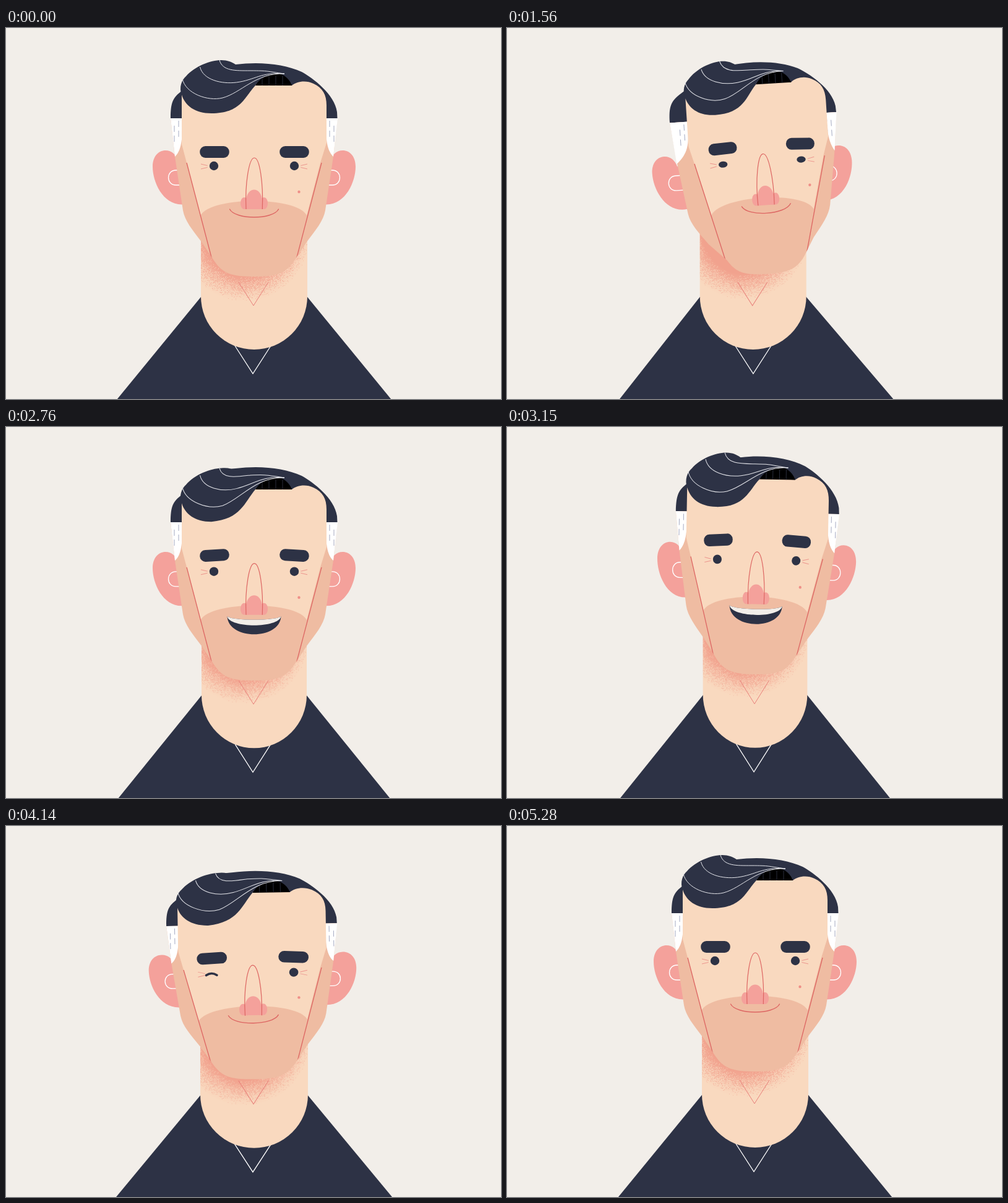
These frames come from a looping animation (800 by 600 pixels, 5400 ms). An HTML page with a canvas:

```html
<!DOCTYPE html>
<html lang="en">
<head>
<meta charset="utf-8">
<title>Portrait</title>
<style>
html, body { margin: 0; width: 100%; height: 100%; overflow: hidden; background: #f2eee9; }
canvas { display: block; }
</style>
</head>
<body>
<canvas id="stage" width="800" height="600"></canvas>
<script>
const g = document.getElementById("stage").getContext("2d");
const LOOP = 5400, CX = 401, CY = 250;
const BG = "#f2eee9", NAVY = "#2d3245", SKIN = "#f9d9bf", SHADE = "#efbca2",
      PINK = "#f4a19b", RED = "#dd6562", WHITE = "#ffffff";

// Poses name only what differs from rest.
const rest = { x: 0, y: 0, roll: 0, turn: 0, nod: 0, squash: 0, lift: 0, breath: 0, sway: 0 };
const pose = changes => ({ ...rest, ...changes });
const aside = pose({ x: 7.5, y: -2.5, roll: -3.2, turn: 1, lift: 4, sway: 1 });
const drift = pose({ x: 3.5, y: -1.5, roll: -3.7, turn: .66, lift: 3, sway: 1.1 });
const crouch = pose({ y: 13, nod: 1, squash: 1, breath: 2 });
const rise = pose({ y: 8, nod: .9, lift: 3.6, breath: -1.2 });
const grin = pose({ x: 2, y: -5.2, roll: 1.1, nod: -.7, squash: -.9, lift: 8, breath: -2 });
const wink = pose({ x: -2, y: 11.2, roll: -1, nod: 1, squash: 1, lift: 3, breath: 1.2 });
const raised = pose({ y: -5 });
const beats = [[0, rest], [480, aside], [1100, aside], [1560, drift], [2150, crouch], [2400, crouch],
  [2760, rise], [3060, grin], [3760, grin], [4140, wink], [4280, wink], [4750, raised], [LOOP, raised]];

const clamp = v => Math.max(0, Math.min(1, v));
const ramp = (t, from, to) => {
  const u = clamp((t - from) / (to - from));
  return u * u * (3 - 2 * u);
};
const pulse = (t, on, off, fade) => ramp(t, on, on + fade) - ramp(t, off, off + fade);

// Monotone cubic between beats: rests at extremes, flows through the others.
function sample(name, t) {
  const i = beats.findIndex((b, j) => t < beats[j + 1][0]);
  const slope = j => beats[j] && beats[j + 1]
    ? (beats[j + 1][1][name] - beats[j][1][name]) / (beats[j + 1][0] - beats[j][0]) : 0;
  const tangent = j => {
    const a = slope(j - 1), b = slope(j);
    return a * b <= 0 ? 0 : 2 * a * b / (a + b);
  };
  const [t0, from] = beats[i], [t1, to] = beats[i + 1];
  const d = t1 - t0, u = (t - t0) / d, v = 1 - u;
  return from[name] * v * v * (1 + 2 * u) + to[name] * u * u * (3 - 2 * u)
    + d * u * v * (tangent(i) * v - tangent(i + 1) * u);
}

function poseAt(t) {
  const p = {};
  for (const name in rest) p[name] = sample(name, t);
  const blink = pulse(t, 1525, 1680, 100);
  p.open = pulse(t, 2480, 3860, 200);
  p.eyeR = 1 - blink;
  p.eyeL = p.eyeR - pulse(t, 3980, 4380, 120);
  return p;
}

// Builds a path whose coordinate pairs pass through a mapping.
const same = (x, y) => [x, y];
const mirror = (x, y) => [2 * CX - x, y];
function shape(d, map = same) {
  return new Path2D(d.replace(/([\d.]+) ([\d.]+)/g, (_, x, y) => map(+x, +y).join(" ")));
}
function fill(path, color) { g.fillStyle = color; g.fill(path); }
function stroke(path, color, width = 1.2) {
  g.strokeStyle = color;
  g.lineWidth = width;
  g.stroke(path);
}
function disc(x, y, rx, ry, color) {
  const path = new Path2D();
  path.ellipse(x, y, rx, ry, 0, 0, 7);
  fill(path, color);
}
function group(draw) { g.save(); draw(); g.restore(); }

// Grainy shadow under the chin.
const grain = document.createElement("canvas");
grain.width = 200;
grain.height = 130;
{
  const c = grain.getContext("2d");
  let seed = 7;
  const random = () => (seed = seed * 16807 % 2147483647) / 2147483647;
  c.fillStyle = "#f1a08c";
  for (let y = 0; y < 130; y++) for (let x = 0; x < 200; x++) {
    const density = clamp((1 - Math.hypot((x - 85) / 107, (y - 10) / 112)) * 2.7) ** 1.2;
    c.globalAlpha = density * .5 + (random() < density ? .45 : 0);
    c.fillRect(x, y, 1, 1);
  }
}

function drawBody(p) {
  group(() => {
    const k = p.sway;
    g.translate(CX, p.breath * .6);
    g.scale(1 + p.breath * .0095, 1);
    g.translate(-CX, 0);
    fill(shape("M401 330L163.5 620L638.5 620Z", (x, y) => [x + k * (-3 + (y - 435) / 33), y]), NAVY);
    g.translate(-k, 0);
    stroke(shape("M370 514L399 559L428 514"), WHITE, 1.3);
    g.translate(-2 * k, 0);
    const neck = new Path2D();
    neck.roundRect(315, 300, 172, 220, [0, 0, 86, 86]);
    fill(neck, SKIN);
    group(() => {
      g.clip(neck);
      g.drawImage(grain, 300, Math.round(320 + p.y * .8 - 3 * p.turn));
    });
    stroke(shape("M376 411L400 449L424 411"), "#e8807a", 1);
  });
}

function drawEar(p, side) {
  const map = (x, y) => [
    (side < 0 ? x : 2 * CX - x) - p.turn * (10.5 + 3.5 * side),
    y + 3 * p.turn - 4.5 * Math.abs(p.nod)
  ];
  fill(shape("M290 285C255 290 237 250 237 224C237 208 246 198 258 198C268 198 275 205 278 215L290 215Z", map), PINK);
  stroke(shape("M290 230L274.5 230C258.5 230 258.5 254 274.5 254L290 254", map), WHITE, 1.3);
}

function drawSideburn(outer, inner, drop) {
  const at = (map, x, y) => map(x, y).join(" ");
  fill(new Path2D(
    "M" + at(outer, 266, 146) + "L" + at(outer, 273, 208 + drop) +
    "C" + [at(inner, 281, 200), at(inner, 286, 188), at(inner, 285, 146)] + "Z"), WHITE);
  for (let i = 0; i < 4; i++) {
    const y = 150 + i * 8, x = (outer(0, y)[0] + inner(0, y)[0]) / 2;
    const dir = outer === mirror ? -1 : 1, shift = dir * (i % 2 ? 272 : 279);
    stroke(new Path2D(`M${x + shift} ${y}v10`), "#8e95b2", .8);
  }
}

function drawHair(front, quiff) {
  fill(shape("M403 93C408 82 420 73 437 73C452 75 459 85 462 93Z", front), "#000");
  for (let x = 414; x < 450; x += 11) stroke(shape(`M${x} 77L${x} 93`, front), "#34384a", .8);
  fill(shape("M284 110C279 95 284 84 291 78C305 62 330 52 348 52C358 52 365 55 371 59L462 74L437 73" +
    "C415 76 408 86 403 93C385 112 380 138 332 138C305 138 289 125 284 108Z", quiff), NAVY);
  // Strands fan out from the parting to the rim of the quiff.
  for (let i = 0; i < 3; i++) {
    const x = 345 - 33 * i + 1.5 * i * i, y = 52 + 7 * i + 4 * i * i;
    const mx = 395 - 22.5 * i, my = 69 + 16 * i + 3 * i * i;
    stroke(shape(`M${x} ${y}C${x + 5} ${y + 18 + 3 * i} ${mx - 24} ${my + 3 * i} ${mx} ${my}` +
      `C${mx + 30} ${my - 4 * i} ${420 - 8 * i} ${70 + i} 450 74`, quiff), "#e4e5ea", 1);
  }
}

function drawHead(p) {
  // The front of the face slides over the skull as the head turns.
  const faceY = p.nod - 5 * p.turn, chinY = -3 * p.turn;
  const front = (x, y) => {
    const upper = clamp((y - 150) / 70), lower = clamp((y - 310) / 80);
    return [x + p.turn * (9 - .05 * (x - CX)), y + upper * faceY + lower * (chinY - faceY)];
  };
  const frontMirror = (x, y) => front(...mirror(x, y));
  const quiff = (x, y) => {
    const [fx, fy] = front(x, y);
    return [fx, fy + 8 * Math.max(0, p.nod) * clamp((403 - x) / 60)];
  };

  drawEar(p, -1);
  drawEar(p, 1);
  fill(shape("M266 146C266 120 270 112 284 102L345 61L371 59C410 54 450 58 478 71C496 81 531 107 535 136L535.5 146Z"), NAVY);

  const skull = (x, y) => y > 350 ? front(x, y) : [x, y];
  const outline = shape("M266 146L273 208L286 295C289 312 301 326 316 346L336 376C350 397 364 402 401 402" +
    "C438 402 452 397 466 376L486 346C501 326 513 312 516 295L529 208L535.5 146Z", skull);
  fill(outline, SHADE);
  drawSideburn(same, front, 8 * Math.max(0, p.turn));
  drawSideburn(mirror, frontMirror, 0);

  fill(shape("M284 100L300 90L403 90L462 93C470 86 485 84 497 90C512 97 518 108 518 125L518 186" +
    "L508 218L486 303C470 272 332 272 314.5 303L292 218L284 188Z", front), SKIN);
  group(() => {
    g.clip(outline);
    for (const map of [front, frontMirror]) stroke(shape("M292 218L342 409", map), RED, 1.3);
  });

  drawHair(front, quiff);
  g.translate(18 * p.turn, 3 * p.nod - 6.5 * p.turn);
  drawFeatures(p);
}

function drawEye(x, open) {
  if (open > .25) return disc(x, 223, 7.2, 7.2 * open, NAVY);
  g.lineCap = "round";
  stroke(new Path2D(`M${x - 8.5} 225.5q8.5 -6 17 0`), NAVY, 3.6);
}

function drawFeatures(p) {
  for (const side of [-1, 1]) {
    const x = CX - 3 * p.turn + side * 65 * (1 - .04 * p.turn);
    drawEye(x, side < 0 ? p.eyeL : p.eyeR);
    for (const v of [-1, 1])
      stroke(new Path2D(`M${x + side * 21} ${224 + v * 4}L${x + side * 10.5} ${224 + v * 1.5}`), "#ec968e", 1);
    group(() => {
      g.translate(x + .5 - side * .5, 200.5 - p.lift);
      g.rotate(side * Math.min(3.5, p.lift * .9) * Math.PI / 180);
      const brow = new Path2D(), w = 47.5 * (1 - .05 * p.turn);
      brow.roundRect(-w / 2, -9.5, w, 19, 9);
      fill(brow, NAVY);
    });
  }
  disc(473.5, 265, 2.2, 2.2, "#ef8f88");

  for (const map of [same, mirror])
    fill(shape("M392 293L385 293C377 293 377 274 385 274C388 274 390 276 392 279Z", map), PINK);
  fill(shape("M388 293L388 278C390 256 412 256 414 278L414 293Z"), PINK);
  stroke(shape("M388 293C386 250 393 210 401.3 210C410 210 416 250 414.3 293"), RED);
  drawMouth(p.open);
}

function drawMouth(open) {
  const half = 39.5 + 4 * open, left = CX - half, right = CX + half, y = 293 + 2.5 * open;
  const curve = (from, to, mid, inset) => {
    const cy = y + (mid - y) * 4 / 3;
    return `C${from + inset} ${cy} ${to - inset} ${cy} ${to} ${y}`;
  };
  const lip = `M${left} ${y}` + curve(left, right, 306 - 5 * open, 9);
  if (open < .04) {
    g.lineCap = "round";
    return stroke(new Path2D(lip), RED, 1.4);
  }
  fill(new Path2D(lip + curve(right, left, 306 + 18.5 * open, -2) + "Z"), NAVY);
  fill(new Path2D(lip + curve(right, left, 306 + 4 * open, -4) + "Z"), BG);
}

function frame() {
  const p = poseAt(performance.now() % LOOP);
  g.fillStyle = BG;
  g.fillRect(0, 0, 800, 600);
  drawBody(p);
  group(() => {
    g.translate(CX + p.x, CY + p.y);
    g.rotate(p.roll * Math.PI / 180);
    g.scale(1 + .023 * p.squash, 1 - .024 * p.squash);
    g.translate(-CX, -CY);
    drawHead(p);
  });
  requestAnimationFrame(frame);
}
frame();
</script>
</body>
</html>
```
